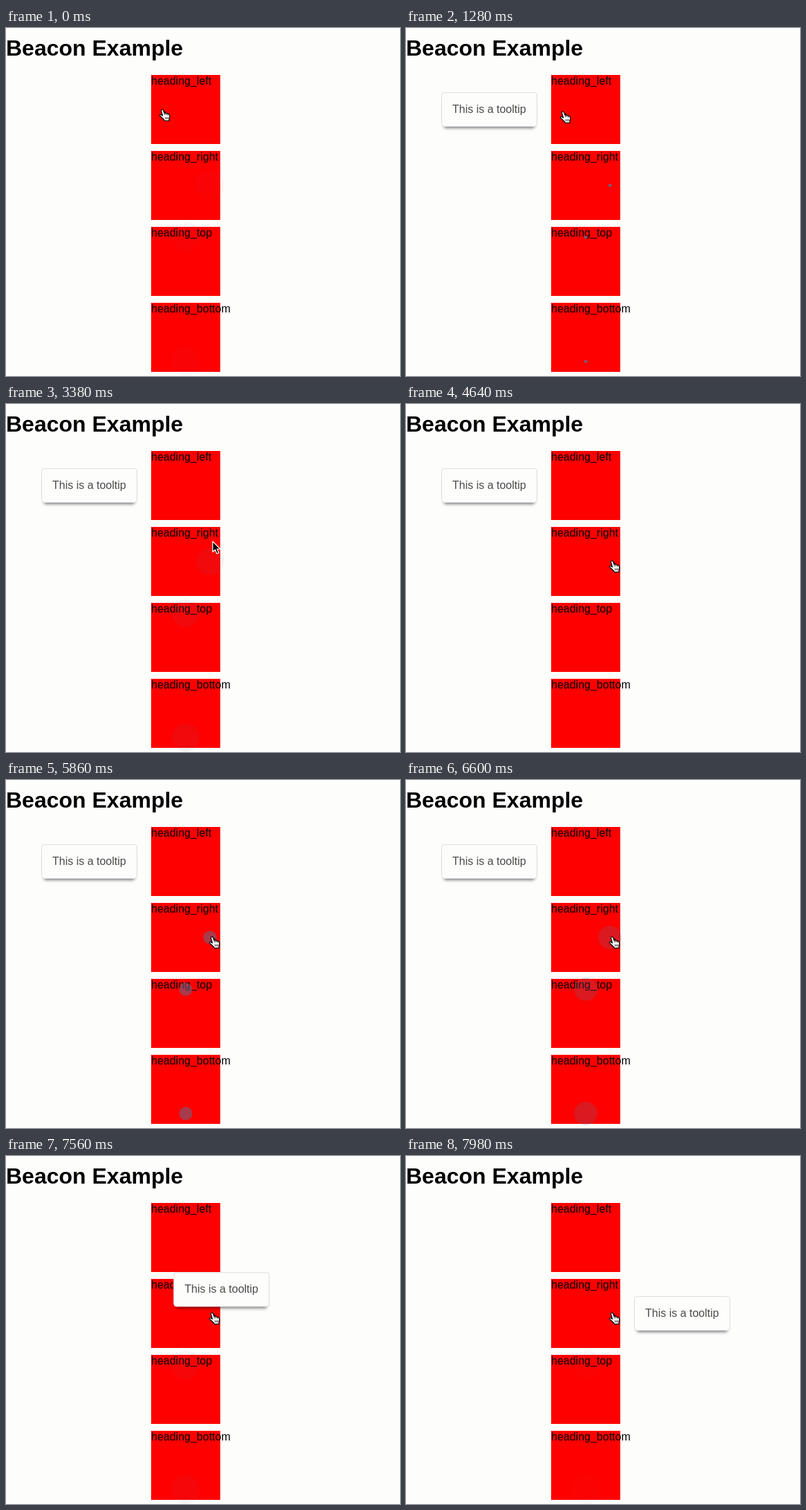
Write an HTML page with a canvas that moves like this. It is 570 by 504 pixels and loops after 8 s.

```html
<!DOCTYPE html>
<html lang="en">
<head>
<meta charset="utf-8">
<title>Beacon Example</title>
<style>
  html, body { margin: 0; width: 100%; height: 100%; overflow: hidden; background: #fdfdfc; }
  canvas { display: block; }
</style>
</head>
<body>
<canvas id="stage" width="570" height="504"></canvas>
<script>
const ctx = document.getElementById('stage').getContext('2d');
const FONT = '"Liberation Sans", Arial, sans-serif';
const LOOP = 8000;
const PAPER = '#fdfdfc';
const PULSE = { length: 84, offset: 65, radius: 22, color: '#646987' };
const TIP = { w: 139, h: 50, from: [51, 93], to: [330, 203] };
const SLIDE = { start: 151, length: 18 };
const FADE = { start: 14, length: 8 };

const clamp = v => Math.min(1, Math.max(0, v));
const mix = (a, b, p) => a + (b - a) * p;

// CSS-style cubic-bezier timing, solved by bisection
function cubicBezier(x1, y1, x2, y2) {
  const curve = (a, b, s) => 3 * a * s * (1 - s) ** 2 + 3 * b * s * s * (1 - s) + s ** 3;
  return x => {
    let lo = 0, hi = 1;
    for (let i = 0; i < 24; i++) {
      const mid = (lo + hi) / 2;
      if (curve(x1, x2, mid) < x) lo = mid; else hi = mid;
    }
    return curve(y1, y2, lo);
  };
}
const ease = cubicBezier(.25, .1, .25, 1);
const easeInOut = cubicBezier(.42, 0, .58, 1);

const arrow = new Path2D('M0 0V15.2L3.5 12L6 17.8L8.8 16.6L6.3 11H11Z');
const hand = new Path2D('M-1.6 1.4C-1.3-.2 1-.4 1.6 1.2L3.2 5.6C4-.0 4 4.6 5.4 5.8C6.6 5 7.6 5.6 8 6.7' +
  'C9.4 6 10.4 7 10.6 8.4C11.2 10.6 11 12.4 10 14.2V16.4H3.4C2.6 14 .4 12.4-1.4 11' +
  'C-3.4 9.4-4 8.4-3.2 7.6C-2.2 6.8-.8 7.8.6 9.2Z');
const knuckles = new Path2D('M3.2 5.6L3.9 8.2M5.4 5.8L6.1 8.2M8 6.7L8.5 8.6M4.6 11V14M6.6 11V14M8.6 11V14');

// Cursor fingertip or arrow tip: [step, x, y]
const cursorPath = [[0, 226, 118], [4, 226, 118], [12, 227, 121], [53, 227, 121], [70, 298, 181],
  [73, 299, 199], [88, 298, 219], [92, 298, 227], [200, 298, 227]];

function cursorAt(step) {
  const i = cursorPath.findIndex(p => p[0] > step);
  const [s0, x0, y0] = cursorPath[i - 1], [s1, x1, y1] = cursorPath[i];
  const p = (step - s0) / (s1 - s0);
  return [mix(x0, x1, p), mix(y0, y1, p)];
}

function text(str, x, y, size, color = '#000', weight = '') {
  ctx.font = `${weight} ${size}px ${FONT}`;
  ctx.fillStyle = color;
  ctx.fillText(str, x, y);
}

function roundBox(x, y, w, h, r) {
  ctx.beginPath();
  ctx.roundRect(x, y, w, h, r);
}

function drawBeacons(step) {
  const scale = ease(((step + PULSE.offset) % PULSE.length) / PULSE.length);
  const centers = [[260, 303], [260, 483]];
  if (step < SLIDE.start) centers.push([295, 228]);
  ctx.globalAlpha = 1 - scale;
  ctx.fillStyle = PULSE.color;
  for (const [x, y] of centers) {
    ctx.beginPath();
    ctx.arc(x, y, PULSE.radius * scale, 0, 2 * Math.PI);
    ctx.fill();
  }
  ctx.globalAlpha = 1;
}

function drawTooltip(step) {
  const opacity = clamp((step - FADE.start) / FADE.length);
  if (!opacity) return;
  const p = easeInOut(clamp((step - SLIDE.start) / SLIDE.length));
  const x = mix(TIP.from[0], TIP.to[0], p), y = mix(TIP.from[1], TIP.to[1], p);
  ctx.globalAlpha = opacity;

  // Small panel that peeks out while the tooltip travels
  ctx.fillStyle = PAPER;
  roundBox(x + TIP.w - 28 + 8.5 * Math.sin(2 * Math.PI * p), y + 11, 28, 28, 3);
  ctx.fill();

  ctx.save();
  ctx.shadowColor = 'rgba(0,0,0,.5)';
  ctx.shadowBlur = 4;
  ctx.shadowOffsetY = 6;
  roundBox(x + 4, y + 4, TIP.w - 8, TIP.h - 8, 3);
  ctx.fill();
  ctx.restore();

  roundBox(x + .5, y + .5, TIP.w - 1, TIP.h - 1, 4);
  ctx.fillStyle = PAPER;
  ctx.fill();
  ctx.strokeStyle = '#dcdcdf';
  ctx.lineWidth = 1;
  ctx.stroke();
  text('This is a tooltip', x + 16, y + 30, 16, '#4a4a4a');
  ctx.globalAlpha = 1;
}

function drawCursor(step) {
  const [x, y] = cursorAt(step);
  const pointing = y < 134 || y >= 213;
  ctx.save();
  ctx.translate(x, y);
  ctx.lineJoin = 'round';
  ctx.lineWidth = 1.2;
  ctx.fillStyle = pointing ? '#fff' : '#000';
  ctx.strokeStyle = pointing ? '#000' : '#fff';
  const shape = pointing ? hand : arrow;
  ctx.fill(shape);
  ctx.stroke(shape);
  if (pointing) {
    ctx.lineWidth = .8;
    ctx.stroke(knuckles);
  }
  ctx.restore();
}

// Steps last 20, 100 and 20 ms in turn
function stepAt(time) {
  const rest = time % 140;
  return 3 * Math.floor(time / 140) + (rest < 20 ? 0 : rest < 120 ? 1 : 2);
}

function draw(step) {
  ctx.fillStyle = PAPER;
  ctx.fillRect(0, 0, 570, 504);
  text('Beacon Example', 0, 40, 32, '#000', 'bold');
  ['left', 'right', 'top', 'bottom'].forEach((side, i) => {
    const y = 68 + 110 * i;
    ctx.fillStyle = '#f00';
    ctx.fillRect(210, y, 100, 100);
    text('heading_' + side, 210, y + 14, 16);
  });
  drawBeacons(step);
  drawTooltip(step);
  drawCursor(step);
}

const began = performance.now();
function tick() {
  draw(stepAt((performance.now() - began) % LOOP));
  requestAnimationFrame(tick);
}
tick();
</script>
</body>
</html>
```
